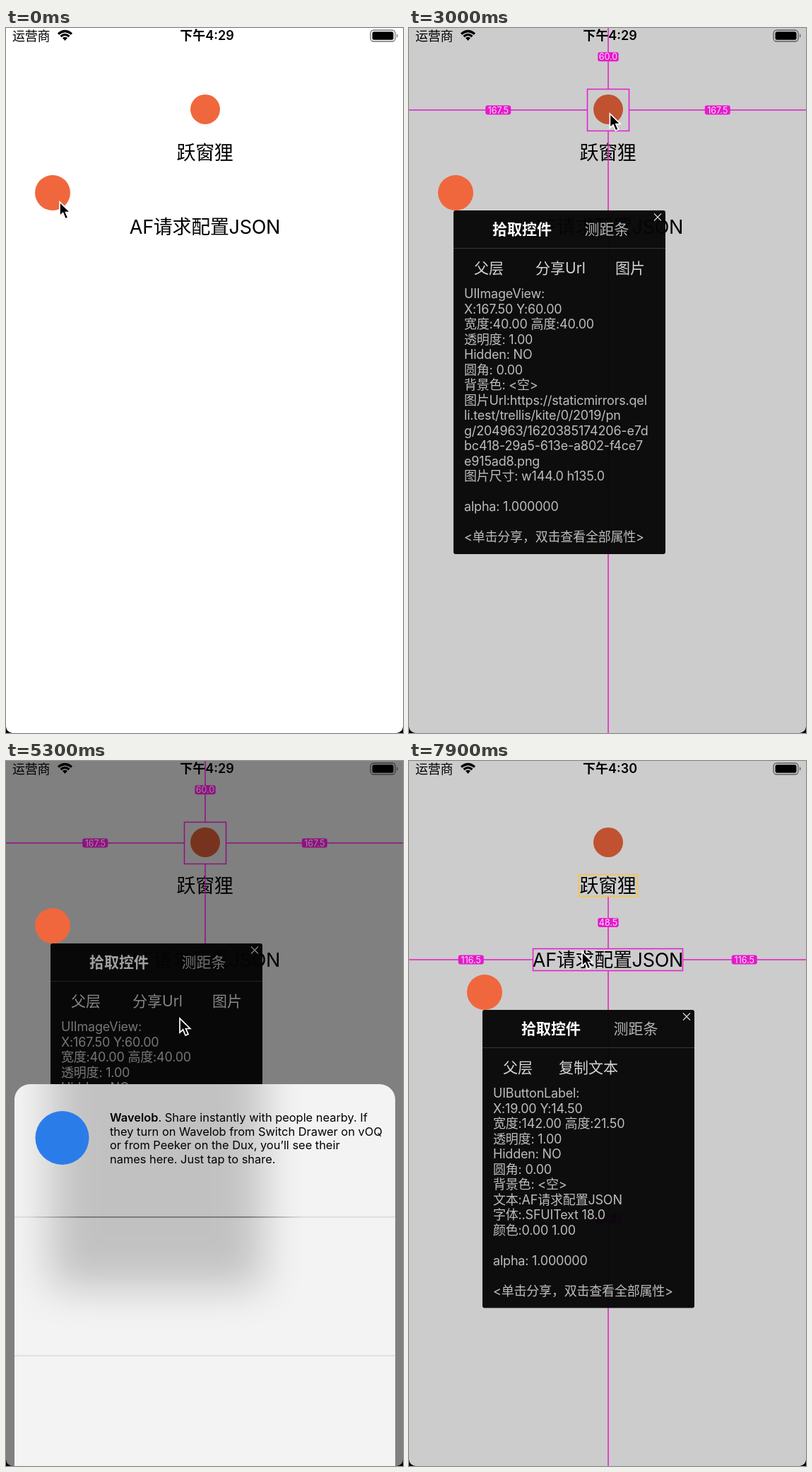
Recreate the animation shown at these times as an HTML page. Size 562 px wide and 997 px high, loop 8 s.

```html
<!DOCTYPE html>
<html lang="zh">
<head>
<meta charset="utf-8">
<style>
html, body { margin: 0; width: 100%; height: 100%; overflow: hidden; background: #fff; }
svg { display: block; width: 100%; height: 100%; }
text { font-family: Inter, "Noto Sans CJK SC", "Noto Sans CJK", sans-serif; white-space: pre; }
.mid { text-anchor: middle; }
.big { font-size: 27px; letter-spacing: -.3px; }
.tab { font-size: 21px; }
.info { font-size: 18px; letter-spacing: -.2px; fill: #bdbdbd; }
.note { font-size: 16.4px; }
</style>
</head>
<body>
<svg id="stage" viewBox="0 0 562 997" preserveAspectRatio="none"></svg>
<script>
const W = 562, H = 997, LOOP = 8000;
const ORANGE = '#f0673d', PINK = '#e31ccb';
const NAME = '跃窗狸', LABEL = 'AF请求配置JSON';

const text = (x, y, s, cls, extra = '') => `<text x="${x}" y="${y}" class="${cls}" ${extra}>${s}</text>`;
const rect = (x, y, w, h, extra = '') => `<rect x="${x}" y="${y}" width="${w}" height="${h}" ${extra}/>`;
const dot = (x, y, r, fill) => `<circle cx="${x}" cy="${y}" r="${r}" fill="${fill}"/>`;
const cross = (x, y, r, color) =>
  `<path d="M${x - r} ${y - r}l${2 * r} ${2 * r}m0 ${-2 * r}l${-2 * r} ${2 * r}" stroke="${color}" stroke-width="1.1"/>`;
const frame = (b, color) => rect(b.x, b.y, b.w, b.h, `fill="none" stroke="${color}" stroke-width="1.5"`);

// Picked views
const image = { x: 252.5, y: 86.5, w: 59, h: 59, gaps: ['167.5', '167.5', '60.0', '567.0'] };
const title = { x: 240.5, y: 160.5, w: 83, h: 31, gaps: ['160.5', '160.5', '10.0', '536.5'] };
const label = { x: 175.5, y: 265.5, w: 212, h: 31, gaps: ['116.5', '116.5', '48.5', '466.5'] };

function tag(x, y, s) {
  const w = s.length * 6.6 + 3;
  return rect(x - w / 2, y - 6.5, w, 13, `rx="3" fill="${PINK}"`) +
    text(x, y + 4.5, s, 'mid', 'font-size="12.5" fill="#ffd5fa"');
}

// Distance lines from a view to the screen edges, or up to a reference view
function guides(id, b, ref) {
  const cx = 282, cy = b.y + b.h / 2, right = b.x + b.w, low = b.y + b.h;
  const top = ref ? ref.y + ref.h : -5;
  return `<g id="${id}Guides">
    <path d="M0 ${cy}H${b.x}M${right} ${cy}H${W}M${cx} ${top}V${b.y}M${cx} ${low}V${H}" stroke="${PINK}" stroke-width="1.5"/>
    ${ref ? frame(ref, '#ffc234') : ''}${frame(b, PINK)}
    ${tag(b.x / 2, cy, b.gaps[0])}${tag((right + W) / 2, cy, b.gaps[1])}
    ${tag(cx, (top + b.y) / 2, b.gaps[2])}${tag(cx, (low + H) / 2, b.gaps[3])}</g>`;
}

const common = (kind, x, y, w, h) => [kind + ':', `X:${x} Y:${y}`, `宽度:${w} 高度:${h}`,
  '透明度: 1.00', 'Hidden: NO', '圆角: 0.00', '背景色: &lt;空&gt;'];
const ending = ['', 'alpha: 1.000000', '', '&lt;单击分享，双击查看全部属性&gt;'];
const caption = s => ['文本:' + s, '字体:.SFUIText 18.0', '颜色:0.00 1.00'];
const lines = {
  image: [...common('UIImageView', '167.50', '60.00', '40.00', '40.00'),
    '图片Url:https://staticmirrors.qel', 'li.test/trellis/kite/0/2019/pn',
    'g/204963/1620385174206-e7d', 'bc418-29a5-613e-a802-f4ce7', 'e915ad8.png',
    '图片尺寸: w144.0 h135.0', ...ending],
  title: [...common('UILabel', '160.50', '110.00', '54.50', '21.50'), ...caption(NAME), ...ending],
  label: [...common('UIButtonLabel', '19.00', '14.50', '142.00', '21.50'), ...caption(LABEL), ...ending]
};

function details(id) {
  const button = (x, s) => text(x, 346.5, s, 'tab', 'fill="#d4d4d4"');
  return `<g id="${id}Info">${rect(63, 311, 300, 1, 'fill="#383838"')}${button(92, '父层')}` +
    (id === 'image' ? button(179, '分享Url') + button(292, '图片') : button(212, '复制文本').replace('212', '171')) +
    lines[id].map((s, i) => text(78, 382 + i * 21.5, s, 'info')).join('') + '</g>';
}

const fullSheet = `<g id="fullSheet">
  <g clip-path="url(#sheetClip)">${rect(63, 200, 300, 544, 'id="shade" fill="#000" opacity=".2" filter="url(#soft)"')}</g>
  ${dot(79.5, 76, 38, '#2a7de9')}
  ${text(147, 52.5, '<tspan font-weight="600">Wavelob</tspan>. Share instantly with people nearby. If', 'note')}
  ${text(147, 72.5, 'they turn on Wavelob from Switch Drawer on vOQ', 'note')}
  ${text(147, 92, 'or from Peeker on the Dux, you’ll see their', 'note')}
  ${text(147, 112, 'names here. Just tap to share.', 'note')}
  ${rect(12, 187.5, 539, 1, 'fill="#cbcbcb"')}${rect(30, 187.5, 390, 1, 'fill="url(#fade)"')}
  ${rect(12, 383.5, 539, 1, 'fill="#cbcbcb"')}</g>`;

const shortSheet = `<g id="shortSheet">${rect(35, 29, 90, 90, 'rx="19" fill="#fff"')}
  ${[60.5, 79.5, 98.5].map(x => dot(x, 74, 6.5, '#5c5c5c')).join('')}
  ${rect(12, 187.5, 539, 1, 'fill="#cbcbcb"')}</g>`;

const viewer = `<g id="viewer">${rect(0, 0, W, H, 'fill="#424242"')}
  ${dot(283, 528, 160, ORANGE)}
  ${rect(30.5, 100.5, 503, 866, 'fill="none" stroke="#fff"')}
  ${rect(30, 56, 90, 44.5)}${rect(443, 56, 90, 44.5)}
  ${cross(75, 78, 13.5, '#fff')}${text(488, 88, '分享', 'big mid', 'fill="#fff"')}</g>`;

const status = `${text(9, 17.5, '运营商', 'info', 'style="fill:#000"')}
  <g fill="none" stroke="#000" stroke-width="3.2"><path d="M74 8.5Q83.5 .5 93 8.5M77.5 12Q83.5 6.8 89.5 12"/></g>
  <path d="M80 14Q83.5 11.4 87 14L83.5 18Z"/>
  ${text(284.5, 17, '', 'mid', 'id="clock" font-size="18" font-weight="600"')}
  ${rect(516, 3, 35, 16, 'rx="4.5" fill="none" stroke="#000" stroke-opacity=".55" stroke-width="1.3"')}
  ${rect(518.5, 5.3, 30, 11.5, 'rx="2.5"')}<path d="M553 8q3 3 0 6z" fill-opacity=".55"/>`;

stage.innerHTML = `<defs>
  <filter id="soft" x="-50%" y="-50%" width="200%" height="200%"><feGaussianBlur stdDeviation="30"/></filter>
  <clipPath id="sheetClip">${rect(12, 0, 539, 600, 'rx="22"')}</clipPath>
  <linearGradient id="fade"><stop stop-color="#333" stop-opacity="0"/><stop offset=".2" stop-color="#333"/>
    <stop offset=".8" stop-color="#333"/><stop offset="1" stop-color="#333" stop-opacity="0"/></linearGradient></defs>
  ${rect(0, 0, W, H, 'fill="#fff"')}
  ${dot(282, 115, 21, ORANGE)}
  ${text(281.5, 186, NAME, 'big mid')}${text(281.5, 291, LABEL, 'big mid')}
  ${rect(0, 0, W, H, 'id="dim"')}
  ${guides('image', image)}${guides('title', title, image)}${guides('label', label, title)}
  <g id="panel">${rect(63, 258, 300, 53, 'id="box" rx="3" fill="#060606" fill-opacity=".96"')}
    ${text(160, 292, '拾取控件', 'tab mid', 'id="pick" fill="#fff"')}
    ${text(280, 292, '测距条', 'tab mid', 'fill="#b4b4b4"')}${cross(352, 267.5, 5, '#ddd')}
    ${details('image')}${details('title')}${details('label')}</g>
  ${rect(0, 0, W, H, 'id="sheetDim"')}
  <g id="sheet">${rect(12, 0, 539, 600, 'rx="22" fill="#f3f3f3"')}${fullSheet}${shortSheet}</g>
  ${viewer}
  <g id="badge">${dot(66, 233, 25, ORANGE)}</g>
  ${status}
  <path d="M0 ${H}v-9q1 8 9 9zM${W} ${H}v-9q-1 8 -9 9z"/>
  <path id="cursor" d="M0 0V20L4.6 15.8L8 24L12 22.3L8.5 14.5H14.8Z" stroke="#fff" stroke-width="1.7"/>`;

const $ = id => document.getElementById(id);
const set = (id, key, value) => $(id).setAttribute(key, value);
const show = (id, on) => set(id, 'display', on ? 'inline' : 'none');
const move = (id, x, y) => set(id, 'transform', `translate(${x} ${y})`);
const ramp = (t, a, b) => Math.min(1, Math.max(0, (t - a) / (b - a)));
const smooth = k => k * k * (3 - 2 * k);
const out = k => 1 - (1 - k) ** 2;

// Pointer stops: time, x, y
const stops = [[0, 76, 246], [600, 76, 246], [1050, 128, 312], [1500, 160, 287], [2200, 160, 287],
  [2650, 284, 116], [2950, 284, 116], [3500, 301, 333], [3850, 301, 333], [4200, 310, 433],
  [4350, 310, 433], [4750, 240, 345], [4950, 240, 345], [5250, 246, 364], [5500, 246, 364],
  [5800, 270, 378], [6200, 270, 378], [6500, 76, 242], [6600, 76, 242], [6950, 117, 336],
  [7000, 117, 336], [7100, 295, 176], [7300, 295, 176], [7600, 245, 270], [LOOP, 245, 270]];

function pointer(t) {
  const i = stops.findIndex(s => s[0] > t);
  const [a, x0, y0] = stops[i - 1], [b, x1, y1] = stops[i];
  const k = smooth(ramp(t, a, b));
  return [x0 + (x1 - x0) * k, y0 + (y1 - y0) * k];
}

function draw(t) {
  const picked = t < 2800 ? '' : t < 7300 ? 'image' : t < 7650 ? 'title' : 'label';
  for (const id in lines) {
    show(id + 'Guides', id === picked);
    show(id + 'Info', id === picked);
  }
  set('box', 'height', picked ? lines[picked].length * 21.5 + 120.5 : 53);
  set('pick', 'font-weight', t < 1700 ? 400 : 600);
  set('dim', 'opacity', .2 * ramp(t, 1680, 1900));
  set('panel', 'opacity', ramp(t, 300, 550));

  const drag = smooth(ramp(t, 6600, 6950));
  move('panel', 41 * drag, 94 * drag);
  move('badge', 41 * drag, 94 * drag);
  show('badge', t < 3900 || t > 4450);
  set('viewer', 'opacity', ramp(t, 3630, 3930) - ramp(t, 4200, 4500));

  const rise = out(ramp(t, 4900, 5250)), leave = out(ramp(t, 5790, 6290));
  const y = H - 540 * rise + 188 * smooth(ramp(t, 5500, 5650)) + 352 * leave;
  move('sheet', 0, y);
  move('shade', 0, -y);
  show('fullSheet', t < 5570);
  show('shortSheet', t >= 5570);
  set('sheetDim', 'opacity', .375 * rise * (1 - leave));

  $('clock').textContent = t < 6700 ? '下午4:29' : '下午4:30';
  move('cursor', ...pointer(t));
}

const start = performance.now();
function tick() {
  draw((performance.now() - start) % LOOP);
  requestAnimationFrame(tick);
}
tick();
</script>
</body>
</html>
```
